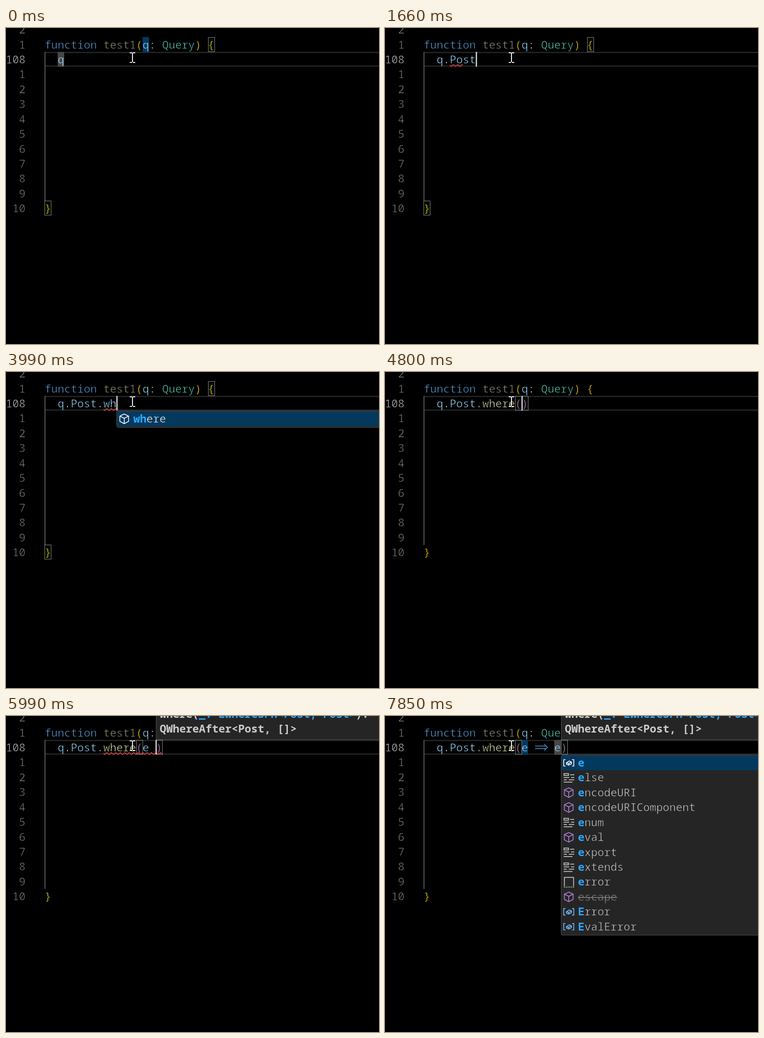
Animation of 814x688 px, one loop 8 s. Source, as an HTML page with a canvas:

```html
<!DOCTYPE html>
<html lang="en">
<head>
<meta charset="utf-8">
<title>Editor completion</title>
<style>
html, body { margin: 0; width: 814px; height: 688px; overflow: hidden; background: #000; }
canvas { display: block; }
</style>
</head>
<body>
<canvas id="stage" width="814" height="688"></canvas>
<script>
const ctx = document.getElementById('stage').getContext('2d');
const ink = document.createElement('canvas').getContext('2d');
ink.canvas.width = 400;
ink.canvas.height = 40;

const LOOP = 8000, CHAR = 14.25, ROW = 32.43, LEFT = 84.3, TOP = 19.6;
const BLUE = '#9cdcfe', PLAIN = '#d4d4d4', YELLOW = '#dcdcaa', GOLD = '#ffd700',
      PINK = '#da70d6', KEYWORD = '#569cd6', MATCH = '#2aaaff', PANEL = '#252526', EDGE = '#454545';

const colX = col => LEFT + col * CHAR;
const rowY = row => TOP + row * ROW;

// Completion entries: icon letter, then label
const tables = ['f Comment', 'f Post', 'f Tag', 'f User'];
const post = ['f Post'];
const methods = ['m groupBy', 'm limit', 'm orderBy', 'm select', 'm selectDistinct', 'm selectFrist', 'm where'];
const where = ['m where'];
const globals = ['k else', 'm encodeURI', 'm encodeURIComponent', 'k enum', 'm eval', 'k export',
  'k extends', 's error', 'm escape', 'v Error', 'v EvalError'];

// Each step changes part of the editor state
const steps = [
  [0, { text: 'q', caret: 0, unused: 1, braces: 1, marks: [[0, 15], [1, 2]], wavy: null, list: null, match: 0,
        call: 0, method: 0, help: 0, braceError: 0 }],
  [270, { text: 'q.', caret: 1, marks: [], list: tables }],
  [600, { unused: 0, braceError: 1 }],
  [730, { caret: 0 }],
  [1130, { text: 'q.P', caret: 1, list: post, match: 1 }],
  [1330, { text: 'q.Po', match: 2 }],
  [1660, { text: 'q.Post', list: null, match: 0, wavy: [4, 6], unused: 1, braceError: 0 }],
  [1930, { text: 'q.Post.' }],
  [2000, { wavy: null }],
  [2070, { list: methods }],
  [2340, { unused: 0, braceError: 1 }],
  [2540, { caret: 0 }],
  [3000, { caret: 1 }],
  [3460, { text: 'q.Post.w', list: where, match: 1 }],
  [3660, { text: 'q.Post.wh', match: 2 }],
  [3990, { wavy: [9, 11], unused: 1, braceError: 0 }],
  [4070, { text: 'q.Post.whe', match: 3, wavy: [9, 12] }],
  [4270, { text: 'q.Post.wher', match: 4, wavy: [9, 13] }],
  [4400, { text: 'q.Post.where', match: 5, wavy: [9, 14] }],
  [4530, { wavy: null }],
  [4600, { method: 1 }],
  [4800, { text: 'q.Post.where(', call: 1, braces: 0, list: null, match: 0 }],
  [4930, { help: 1 }],
  [5130, { wavy: [9, 16] }],
  [5260, { caret: 0 }],
  [5660, { text: 'q.Post.where(e', caret: 1, wavy: [9, 17] }],
  [5730, { list: [...globals, 'v Element'], match: 1 }],
  [5990, { text: 'q.Post.where(e ', list: null, wavy: [9, 18] }],
  [6060, { wavy: [15, 16] }],
  [6320, { text: 'q.Post.where(e =' }],
  [6720, { text: 'q.Post.where(e =>' }],
  [6850, { unused: 0, wavy: null }],
  [6920, { wavy: [19, 20] }],
  [7120, { text: 'q.Post.where(e => ', wavy: [20, 21] }],
  [7320, { text: 'q.Post.where(e => e', wavy: [21, 22] }],
  [7390, { list: ['v e', ...globals], match: 1 }],
  [7590, { wavy: null }],
  [7720, { unused: 1 }],
  [7850, { caret: 0, marks: [[1, 15], [1, 20]] }]
];

function stateAt(time) {
  const state = {};
  for (const [start, change] of steps) if (start <= time) Object.assign(state, change);
  return state;
}

function writeBold(text, x, y, color) {
  ctx.font = '700 23.75px "Noto Sans Mono", monospace';
  ctx.fillStyle = color;
  ctx.fillText(text, x, y);
}

// Light weight: the regular glyphs with their outline shaved off
function write(text, x, y, color) {
  const left = Math.floor(x) - 4, top = Math.floor(y) - 28;
  ink.clearRect(0, 0, 400, 40);
  ink.font = '23.75px "Noto Sans Mono", monospace';
  ink.fillStyle = color;
  ink.lineWidth = .65;
  ink.lineJoin = 'round';
  ink.globalCompositeOperation = 'source-over';
  ink.fillText(text, x - left, y - top);
  ink.globalCompositeOperation = 'destination-out';
  ink.strokeText(text, x - left, y - top);
  ctx.drawImage(ink.canvas, left, top);
}

function fill(color, x, y, w, h) {
  ctx.fillStyle = color;
  ctx.fillRect(x, y, w, h);
}

function path(x, y, points, closed) {
  ctx.beginPath();
  for (let i = 0; i < points.length; i += 2) ctx.lineTo(x + points[i], y + points[i + 1]);
  if (closed) ctx.closePath();
  ctx.stroke();
}

function bracketBox(col, row) {
  ctx.strokeStyle = '#888';
  ctx.lineWidth = 1;
  const x = Math.round(colX(col)) + .5, y = Math.round(rowY(row)) + .5;
  fill('rgba(0,100,0,.1)', x, y, 14, 31);
  ctx.strokeRect(x, y, 14, 31);
}

function squiggle(from, to, row) {
  const x = colX(from), width = (to - from) * CHAR, bottom = rowY(row + 1) - .5;
  ctx.save();
  ctx.beginPath();
  ctx.rect(x, bottom - 6, width, 7);
  ctx.clip();
  ctx.strokeStyle = '#f14c4c';
  ctx.lineWidth = 1.6;
  const points = [];
  for (let i = -1; i * 4.87 < width + 5; i++) points.push(2.8 + i * 4.87, i % 2 ? -4.2 : -.4);
  path(x, bottom, points);
  ctx.restore();
}

function icon(kind, x, y, color) {
  ctx.strokeStyle = color;
  ctx.lineWidth = 1.7;
  if (kind === 'm') {
    path(x, y, [0, -10.5, 9.5, -6, 9.5, 5.5, 0, 10.5, -9.5, 5.5, -9.5, -6], true);
    path(x, y, [-9.5, -6, 0, -1.3, 9.5, -6]);
    path(x, y, [0, -1.3, 0, 10.5]);
  } else if (kind === 'k') {
    ctx.strokeRect(x - 10.5, y - 9, 10, 4);
    for (const [from, to, dy] of [[3, 12, -6.5], [-11, 1, -.5], [5, 12, -.5], [-11, -4, 4.5], [0, 12, 4.5], [-11, 8, 9.5]])
      path(x, y, [from, dy, to, dy]);
  } else if (kind === 's') {
    path(x, y, [-9.5, 9, -9.5, -10, 10.5, -10, 10.5, 9]);
    for (let i = 0; i < 6; i++) fill(color, x - 10.5 + i * 4, y + 10, 2, 2);
  } else {
    const size = kind === 'v' ? 1 : 1.75;
    path(x, y, [-5, 0, 1, -4, 6, -2, 6, 2, 0, 5, -5, 3].map(n => n * size), true);
    path(x, y, [-5, 0, 0, 1.5, 6, -2].map(n => n * size));
    path(x, y, [0, 1.5 * size, 0, 5 * size]);
    if (kind === 'v') for (const side of [-1, 1])
      path(x, y, [7 * side, -7, 11 * side, -7, 11 * side, 7, 7 * side, 7]);
  }
}

function completions(list, match, x) {
  ctx.beginPath();
  ctx.roundRect(x + .5, 85, 700, list.length * ROW + 3, 4);
  ctx.fillStyle = PANEL;
  ctx.fill();
  ctx.strokeStyle = EDGE;
  ctx.lineWidth = 1.4;
  ctx.stroke();
  fill('#04395e', x + 1.5, 86, 700, 32);
  list.forEach((entry, i) => {
    const kind = entry[0], label = entry.slice(2), y = 86 + i * ROW, textX = x + 37;
    const iconColor = i ? { m: '#b180d7', k: '#ccc', s: '#ccc', v: '#75beff', f: '#75beff' }[kind] : '#fff';
    icon(kind, x + 17, y + 16, iconColor);
    if (label === 'escape') {
      write(label, textX, y + 24, '#858585');
      fill('#858585', textX, y + 16.5, label.length * CHAR, 1.6);
      return;
    }
    writeBold(label.slice(0, match), textX, y + 24, MATCH);
    write(label.slice(match), textX + match * CHAR, y + 24, i ? '#ccc' : '#fff');
  });
}

function signature(x) {
  fill(PANEL, x, 0, 814, 52);
  fill(EDGE, x, 0, 1.3, 52);
  fill(EDGE, x, 50.7, 814, 1.3);
  const textX = x + 8.5, parameter = '_: EWhereSFn<Post, Post>';
  writeBold('where(', textX, 3.6, '#ccc');
  writeBold(parameter, textX + 6 * CHAR, 3.6, MATCH);
  writeBold('):', textX + (6 + parameter.length) * CHAR, 3.6, '#ccc');
  writeBold('QWhereAfter<Post, []>', textX, 36, '#ccc');
}

function codeLine(state) {
  let col = 2;
  const baseline = rowY(1) + 25;
  for (const token of (state.text + (state.call ? ')' : '')).match(/=>|\w+|\W/g)) {
    const x = colX(col);
    if (token === '=>') {
      ctx.strokeStyle = KEYWORD;
      ctx.lineWidth = 1.5;
      path(x, 68.2, [1, -2.8, 25, -2.8]);
      path(x, 68.2, [1, 2.8, 25, 2.8]);
      path(x, 68.2, [21, -7, 28, 0, 21, 7]);
    } else {
      const color = /[()]/.test(token) ? PINK : !/\w/.test(token) ? PLAIN
        : token === 'where' && state.method ? YELLOW : BLUE;
      write(token, x, baseline, color);
    }
    col += token.length;
  }
}

function draw(state) {
  const caretCol = 2 + state.text.length, caretX = colX(caretCol);
  fill('#000', 0, 0, 814, 688);
  fill('#282828', 85, 52, 729, 2.5);
  fill('#282828', 85, 81.7, 729, 2.5);
  fill('#707070', 84.3, 52, 1.6, 324.5);

  state.marks.forEach(([row, col], i) =>
    fill(i ? '#474747' : '#04395e', colX(col), rowY(row), CHAR, ROW));
  if (state.braces) {
    bracketBox(25, 0);
    bracketBox(0, 11);
  }
  if (state.call) {
    bracketBox(14, 1);
    bracketBox(caretCol, 1);
  }

  for (let row = -1; row < 12; row++) {
    const label = row === 1 ? '108' : String(row < 1 ? 1 - row : row - 1);
    write(label, 42.5 - label.length * CHAR, rowY(row) + 25, row === 1 ? '#c6c6c6' : '#808080');
  }

  const header = [['function', 0, KEYWORD], ['test1', 9, state.unused ? '#939372' : YELLOW], ['(', 14, GOLD],
    ['q', 15, BLUE], [':', 16, PLAIN], ['Query', 18, '#4ec9b0'], [')', 23, GOLD], ['{', 25, GOLD]];
  for (const [text, col, color] of header) write(text, colX(col), rowY(0) + 25, color);
  write('}', LEFT, rowY(11) + 25, GOLD);
  codeLine(state);

  if (state.wavy) squiggle(...state.wavy, 1);
  if (state.braceError) squiggle(0, 1, 11);
  if (state.caret) fill('#d0d0d0', caretX - .3, 52, 2.8, 32);
  if (state.list) completions(state.list, state.match, Math.round(caretX));
  if (state.help) signature(Math.round(caretX));

  // Mouse pointer
  fill('#fff', 275, 54, 2, 20);
  for (const y of [53, 74]) {
    fill('#fff', 270, y, 5, 2);
    fill('#fff', 277, y, 5, 2);
  }
}

function tick() {
  draw(stateAt(performance.now() % LOOP));
  requestAnimationFrame(tick);
}
tick();
</script>
</body>
</html>
```
